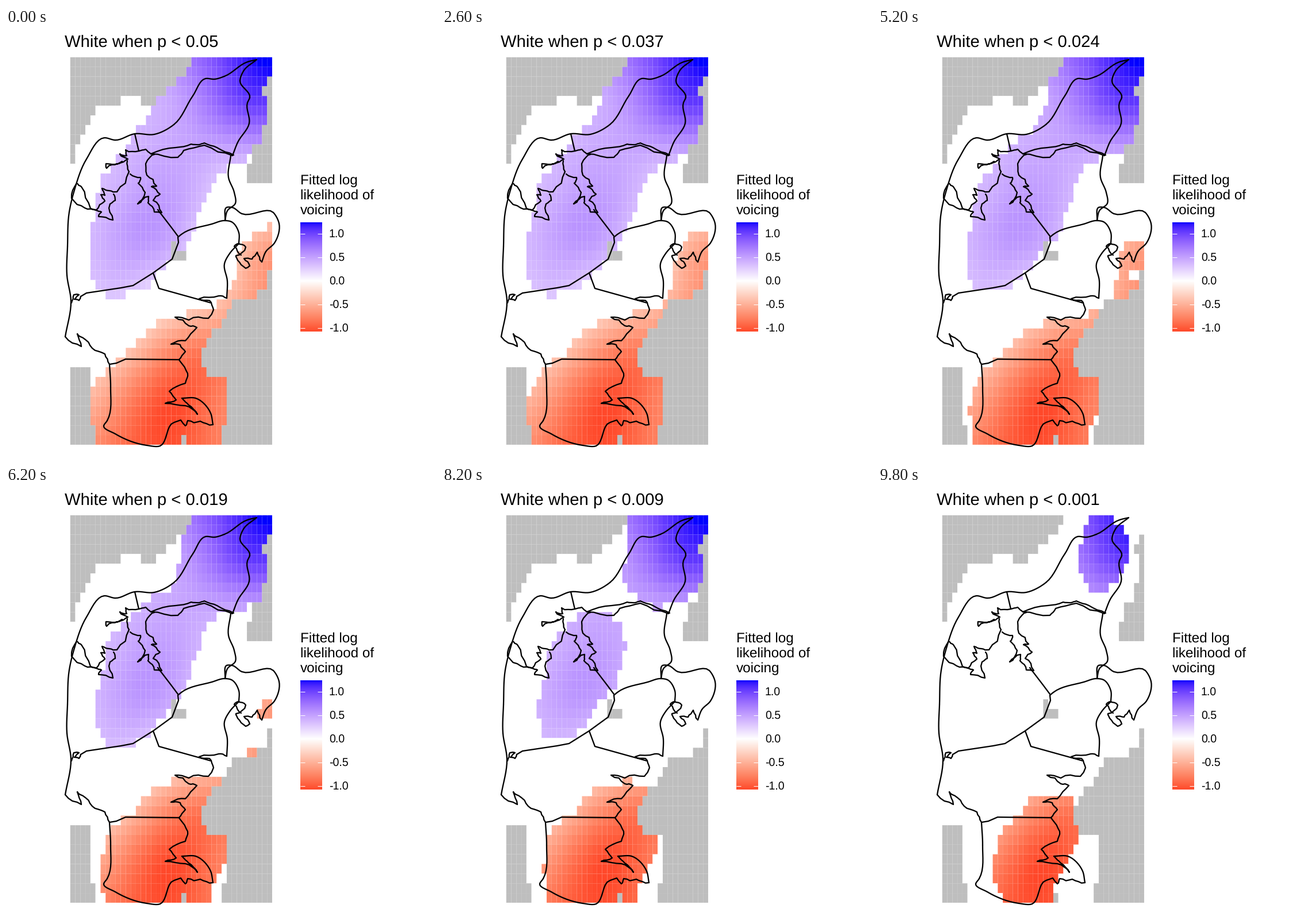
Recreate the animation shown at these times as a matplotlib script. Size 748 by 748 pixels, loop 10000 ms.

```python
import numpy as np
import matplotlib.pyplot as plt
from matplotlib.animation import FuncAnimation
from matplotlib.collections import PolyCollection
from matplotlib.path import Path

SIZE, DPI = 748, 64
PT = 72 / DPI                       # points per pixel
N = 40                              # the map is N x N tiles
X0, Y0, TILE_W, TILE_H = 111.8, 50.9, 8.78, 16.85
TOP, BOTTOM = 1.238, -1.073         # range of fitted values
GREY = (0.745, 0.745, 0.745)

plt.rcParams["font.family"] = "Liberation Sans"
plt.rcParams["text.hinting"] = "none"
rng = np.random.default_rng(4)
fig = plt.figure(figsize=(SIZE / DPI, SIZE / DPI), dpi=DPI, facecolor="white")
ax = fig.add_axes([0, 0, 1, 1])
ax.axis("off")


# ---- colour scale: red - white - blue, blended in CIE Lab ----
def diverging(v):
    t = np.asarray(v, float)[..., None] / TOP
    white = np.array([100, 0, 0])
    end = np.where(t < 0, [53.24, 80.09, 67.2], [32.3, 79.19, -107.86])
    L, a, b = np.moveaxis(white + np.abs(t) * (end - white), -1, 0)
    fy = (L + 16) / 116
    f = np.stack([fy + a / 500, fy, fy - b / 200], -1)
    xyz = np.where(f > 6 / 29, f ** 3, 3 * (6 / 29) ** 2 * (f - 4 / 29))
    xyz = xyz * [0.95047, 1, 1.08883]
    rgb = xyz @ np.array([[3.2406, -0.9689, 0.0557],
                          [-1.5372, 1.8758, -0.2040],
                          [-0.4986, 0.0415, 1.0570]])
    rgb = np.clip(rgb, 0, 1)
    return np.where(rgb > 0.0031308,
                    1.055 * np.maximum(rgb, 1e-9) ** (1 / 2.4) - 0.055,
                    12.92 * rgb)


cols, rows = np.meshgrid(np.arange(N), np.arange(N))
centres = np.column_stack([cols.ravel(), rows.ravel()]) + 0.5


def spline(points, smooth):
    """Thin-plate spline through (column, row, value), at the tile centres."""
    pts = np.array(points, float)
    scale = np.array([TILE_W, TILE_H]) / 100
    keys, at = pts[:, :2] * scale, centres * scale

    def kernel(q):
        d2 = ((q[:, None] - keys) ** 2).sum(-1)
        return 0.5 * d2 * np.log(d2 + 1e-12)

    def plane(q):
        return np.column_stack([np.ones(len(q)), q])

    n = len(pts)
    system = np.block([[kernel(keys) + smooth * np.eye(n), plane(keys)],
                       [plane(keys).T, np.zeros((3, 3))]])
    w = np.linalg.solve(system, np.r_[pts[:, 2], 0, 0, 0])
    return (kernel(at) @ w[:n] + plane(at) @ w[n:]).reshape(N, N)


# ---- fitted values ----
fitted = spline([
    (39.5, .5, 1.26), (34, .5, 1.15), (29.5, .5, .96), (24.5, .5, .76),
    (34, 4.5, 1.02), (38, 5, 1.02), (27.5, 5.5, .70), (21, 4, .50),
    (37, 8.5, .64), (24, 8.5, .50), (14, 9, .42), (32, 10.5, .40),
    (22, 12, .48), (7, 14.5, .38), (26, 15.5, .35), (14, 17.5, .57),
    (5, 21, .38), (20, 20, .42), (10, 24.5, .30), (30, 22, -.20),
    (36.5, 20, -.55), (37.5, 23, -.64), (18, 27.5, -.36), (28, 27, -.52),
    (12, 30.5, -.42), (21, 30.5, -.80), (26, 30.5, -.86), (5, 35.5, -.52),
    (12, 35.5, -.82), (20.5, 36, -1.08), (30, 35, -.80), (6, 39.5, -.74),
    (18, 39.5, -1.06), (29.5, 39, -.80),
], smooth=0.004)
blue = diverging(np.clip(fitted, .2, TOP))
red = diverging(np.clip(fitted, BOTTOM, -.2))


# ---- test statistic, pinned along a few significance contours ----
def critical(p):
    """Two-sided normal quantile (Hastings' approximation)."""
    t = np.sqrt(-2 * np.log(p / 2))
    return t - (2.30753 + 0.27061 * t) / (1 + 0.99229 * t + 0.04481 * t * t)


pins = [(32.5, 3, 3.8), (14, 16.5, 3.1), (18, 35, -3.9), (36, 23.6, -2.36),
        (5, 6, 1.3)]


def contour(p, sign, *pts):
    pins.extend((c, r, sign * critical(p)) for c, r in pts)


contour(.05, 1, (17, 4.5), (12, 8.5), (8, 11.5), (5, 15.5), (4, 20),
        (6, 24.3), (15, 23.7), (24, 18.5), (28, 13.5), (36, 10.2))
contour(.024, 1, (21, 4), (13, 9.5), (6, 16.5), (12, 23.9), (26, 14),
        (30, 10.7))
contour(.014, 1, (23.3, 3), (24.5, 9), (9, 12.5), (5.3, 20), (9, 23.8),
        (18, 20.5), (25, 13.8), (36, 9))
contour(.005, 1, (25.3, 4), (31, 9), (38, 6.5), (38.5, .5), (9, 15),
        (8, 21.6), (17, 19.3), (21, 13), (16, 10.5))
contour(.001, 1, (29, .7), (27, 4.5), (31, 8), (37, 3.5), (34.5, .5))

contour(.05, -1, (36.5, 18), (33, 20.5), (32, 24), (18, 27.3), (9, 31.5),
        (3.8, 35))
contour(.024, -1, (37, 22), (33, 25.4), (38, 23.3), (19, 27.6), (5.5, 36.5),
        (29, 38.5))
contour(.014, -1, (22.5, 27.3), (13, 30.5), (7, 35), (27.5, 38), (30.7, 34.7))
contour(.005, -1, (18, 28.4), (10, 32.5), (9, 38.5), (25, 39.5), (29, 33.5),
        (27.2, 28.3))
contour(.001, -1, (20, 28.6), (12, 32.5), (10.5, 38), (22, 39.3), (26.5, 34))
statistic = spline(pins, smooth=0.001)

# ---- tiles without data: outlines in tile units ----
no_data = np.zeros(N * N, bool)


def void(*outline):
    no_data[Path(outline).contains_points(centres)] = True


void((0, 0), (25.2, 0), (19, 3.7), (17.2, 4.2), (17.2, 5), (14, 5), (14, 4),
     (10, 4), (10, 5), (5.5, 5), (1, 9.5), (1, 11), (0, 11))
void((40, 2), (39, 2), (39, 3), (38, 3), (38, 4), (39, 4), (39, 7), (38, 7),
     (38, 9), (36, 9), (36, 11), (35, 11), (35, 13), (40, 13))
void((40, 22), (39, 22), (39, 24), (37, 24), (37, 25), (32, 25), (30, 27.5),
     (28, 28.5), (27, 29.5), (26, 31), (26, 32), (27, 33), (30, 33),
     (31, 34), (31, 38), (30, 38), (30, 40), (40, 40))
void((0, 32), (3, 32), (4, 33), (4, 38), (5, 38), (5, 40), (0, 40))
void((20, 19), (21, 19), (21, 20), (23, 20), (23, 21), (20, 21))
void((22, 39), (23, 39), (23, 40), (22, 40))
no_data = no_data.reshape(N, N)


def tile_colours(p):
    z = critical(p)
    rgb = np.ones((N, N, 3))
    rgb[statistic > z] = blue[statistic > z]
    rgb[statistic < -z] = red[statistic < -z]
    rgb[no_data] = GREY
    return rgb.reshape(-1, 3)


square = np.array([(0, 0), (1, 0), (1, 1), (0, 1)]) - 0.5
corners = (centres[:, None] + square) * [TILE_W, TILE_H] + [X0, Y0]
tiles = PolyCollection(corners, edgecolors="none", linewidths=0,
                       antialiaseds=True, snap=False)
ax.add_collection(tiles)


# ---- coast and district borders ----
def line(*pts):
    px, py = np.array(pts, float).T
    ax.plot(px, py, color="black", lw=2.3 * PT, solid_joinstyle="round",
            solid_capstyle="round")


def coast(*pts):
    """Smooth cubic curve through the key points."""
    p = np.array(pts, float)
    s = np.r_[0, np.cumsum(np.hypot(*np.diff(p, axis=0).T))]
    slope = np.gradient(p, s, axis=0)
    t = np.linspace(0, 1, 9)[:, None]
    for i, h in enumerate(np.diff(s)):
        line(*((1 + 2 * t) * (1 - t) ** 2 * p[i] + t * (1 - t) ** 2 * h * slope[i]
               + t * t * (3 - 2 * t) * p[i + 1] + t * t * (t - 1) * h * slope[i + 1]))


def fjord(*pts, rough=0.16):
    """Ragged shore: seeded midpoint displacement between the key points."""
    p = np.array(pts, float)
    for _ in range(2):
        d = np.diff(p, axis=0)
        side = np.column_stack([-d[:, 1], d[:, 0]])
        mid = p[:-1] + d / 2 + side * rng.uniform(-rough, rough, (len(d), 1))
        out = np.empty((len(p) + len(mid), 2))
        out[::2], out[1::2] = p, mid
        p = out
    line(*p)


# west coast from the northern tip, then the south
coast((436, 55), (420, 59), (380, 84), (363, 89), (347, 88), (325, 118),
      (292, 168), (258, 185), (224, 184), (190, 195), (171, 191), (140, 228),
      (119, 282), (110, 320), (107, 380), (106, 430), (113, 475), (103, 537))
fjord((103, 537), (131, 554), (124, 532), (134, 539), (150, 557), (172, 567),
      (180, 585), rough=0.1)
coast((180, 585), (182, 625), (176, 683), (170, 692), (190, 706), (245, 726),
      (268, 727), (284, 694))
fjord((284, 694), (304, 682), (312, 692), (316, 683), (338, 684), (360, 690))
coast((360, 690), (356, 670), (330, 644), (306, 644))
fjord((306, 644), (318, 656), (333, 672), (312, 657), (277, 653), (296, 647),
      (284, 632), (312, 618), (316, 601), (303, 580), (301, 577), rough=0.1)

# east side
line((180, 585), (192, 583), (208, 576), (301, 577))
fjord((301, 577), (312, 563), (303, 551), (287, 550), (312, 544), (332, 521),
      (318, 518), (294, 503), (318, 508), (352, 505), (361, 490), (354, 474),
      (336, 471), (370, 466), (384, 470), rough=0.13)
coast((384, 470), (385, 440), (380, 410), (390, 391), (404, 376))
coast((391, 222), (387, 260), (397, 286), (399, 305), (385, 318), (381, 335))
coast((381, 335), (384, 312), (393, 312), (410, 323), (465, 321), (475, 340),
      (467, 374), (452, 389), (445, 407))
fjord((445, 407), (437, 390), (428, 402), (414, 401), (424, 414), (417, 418),
      (403, 404), (400, 396), (417, 381), (404, 375), (397, 380), (409, 395))

# inland borders
coast((405, 376), (405, 356), (392, 337), (381, 335), (358, 341), (305, 359),
      (299, 364))
line((299, 364), (300, 373), (289, 402), (256, 426), (221, 448), (200, 452),
     (140, 461), (130, 467))
fjord((130, 467), (127, 474), (119, 472), (127, 464), (118, 464), (114, 478),
      rough=0.1)
line((256, 426), (266, 453), (320, 468), (356, 478))
line((224, 184), (231, 214))
line((264, 316), (287, 346), (299, 362))

# the long northern fjord and the coast back to the tip
fjord((231, 214), (243, 211), (252, 219), (295, 208), (322, 202), (336, 203),
      (345, 200), (367, 208), (396, 221), rough=0.06)
fjord((252, 219), (299, 225), (309, 213), (345, 204), (394, 222), rough=0.06)
coast((394, 222), (403, 199), (423, 166), (420, 130), (424, 121), (407, 92),
      (413, 75), (436, 55))

# fjord arms
fjord((258, 220), (246, 230), (245, 256), (262, 275), (253, 276), (268, 289),
      (256, 300), (271, 321), (258, 320), (247, 304), (248, 293), (229, 306),
      (242, 286), (230, 270), (234, 260), (216, 254))
fjord((231, 214), (208, 212), (210, 222), (198, 219), (212, 228), (196, 236),
      (175, 244), (174, 236), (202, 232))
fjord((211, 231), (214, 250), (193, 285), (180, 283), (167, 279), (172, 291),
      (165, 290), (172, 301), (157, 317), (147, 314), (131, 276), (123, 270),
      (114, 296), rough=0.12)
fjord((114, 296), (137, 313), (157, 317), (166, 320), (161, 328), (186, 334),
      (181, 306), (190, 300), (187, 289), rough=0.12)


# ---- text and legend ----
def label(x, y, text, px):
    return ax.text(x, y, text, fontsize=px * PT, color="black",
                   ha="left", va="baseline")


title = label(102, 33, "", 29.2)
for i, words in enumerate(("Fitted log", "likelihood of", "voicing")):
    label(512, 272 + 26.2 * i, words, 24.3)

ramp = diverging(np.linspace(TOP, BOTTOM, 300))[:, None, :]
ax.imshow(ramp, extent=(512, 550, 528.3, 338.3), aspect="auto",
          interpolation="bilinear", origin="upper")
for v in np.linspace(1, -1, 5):
    ty = 440 - 82 * v
    for tx in (512, 542.4):
        ax.plot([tx, tx + 7.6], [ty, ty], color="white", lw=PT,
                solid_capstyle="butt")
    label(562, ty + 7, f"{v:.1f}", 19.5)

ax.set_xlim(0, SIZE)
ax.set_ylim(SIZE, 0)


def update(i):
    p = round(0.05 - 0.001 * i, 3)
    title.set_text(f"White when p < {p:g}")
    tiles.set_facecolor(tile_colours(p))
    return tiles, title


anim = FuncAnimation(fig, update, frames=50, interval=200, repeat=True,
                     repeat_delay=0, blit=False)
plt.show()
```
